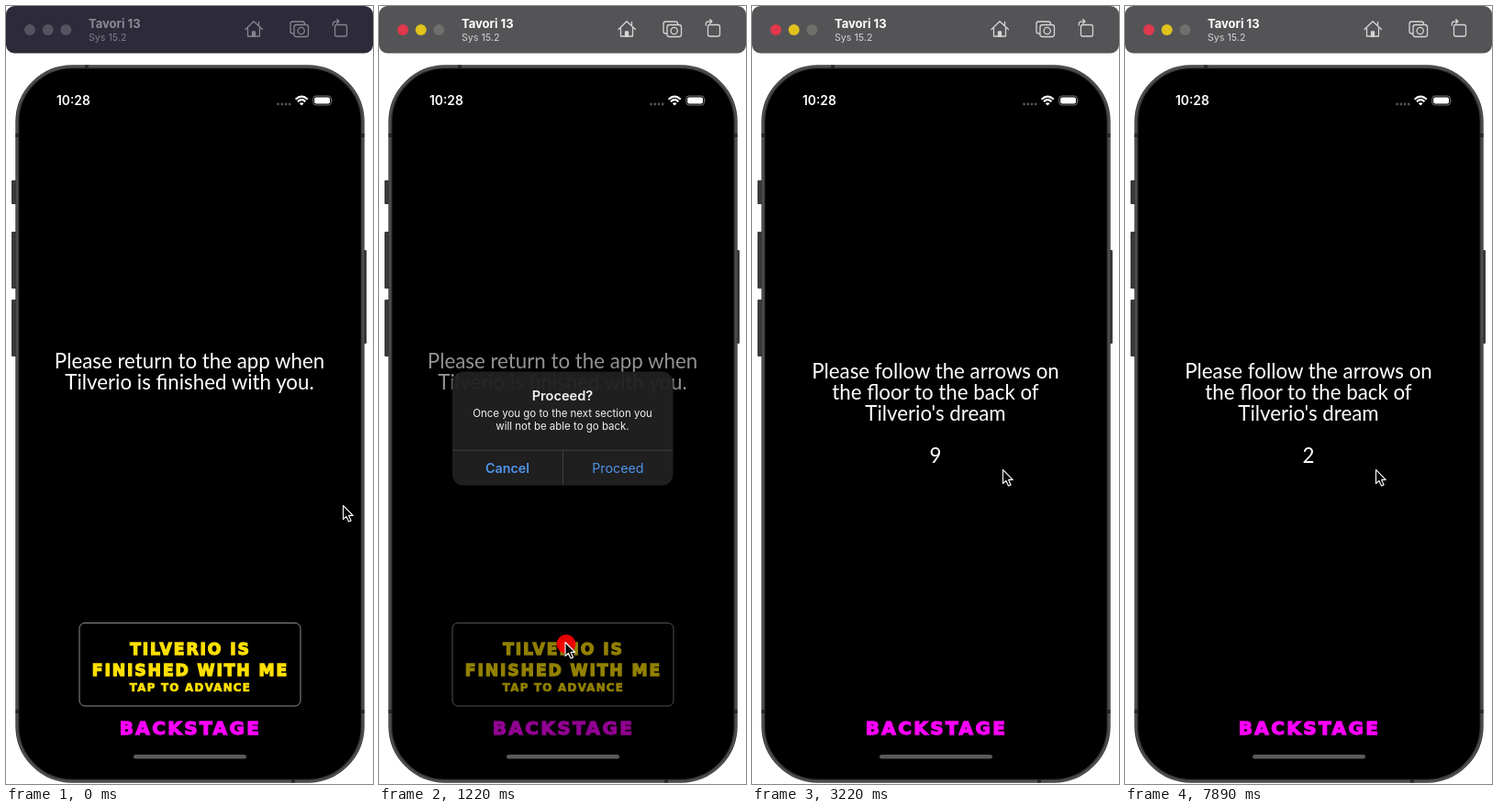
These frames come from a looping animation (400x848 px, 8 s). An HTML page:

```html
<!DOCTYPE html>
<html lang="en">
<head>
<meta charset="utf-8">
<title>Phone walkthrough</title>
<style>
html, body { margin: 0; width: 100%; height: 100%; overflow: hidden; background: #fff; }
svg { display: block; width: 400px; height: 848px; font-family: Inter, Roboto, sans-serif; }
.mid { text-anchor: middle; }
.copy { font: 22.3px Lato, sans-serif; fill: #fff; }
.deco { font: bold 17.2px "DejaVu Sans", sans-serif; letter-spacing: 1.9px; stroke-width: 1.3; }
.gold { fill: #ffe000; stroke: #ffe000; }
.pink { fill: #f0f; stroke: #f0f; }
.link { font-size: 14.2px; fill: #569cf6; }
#bar { --bg: #2d2b3a; --name: #8b8a92; --sub: #7c7b84; --icon: #85848c; --a: #55535f; --b: #55535f; --c: #55535f; }
#bar.on { --bg: #545457; --name: #fff; --sub: #d2d2d3; --icon: #d5d5d6; --a: #e0384c; --b: #e0c21b; --c: #6f6f6c; }
.icon { fill: none; stroke: var(--icon); stroke-width: 1.3; stroke-linejoin: round; stroke-linecap: round; }
</style>
</head>
<body>
<svg viewBox="0 0 400 848">
  <g id="bar">
    <rect width="400" height="51.5" rx="9" fill="var(--bg)"/>
    <circle cx="26" cy="26" r="6" fill="var(--a)"/>
    <circle cx="45.7" cy="26" r="6" fill="var(--b)"/>
    <circle cx="65.4" cy="26" r="6" fill="var(--c)"/>
    <text x="90" y="24" font-size="13" font-weight="700" fill="var(--name)">Tavori 13</text>
    <text x="90" y="37.5" font-size="10.7" fill="var(--sub)">Sys 15.2</text>
    <g class="icon">
      <path d="M261 25.5L270 16.8L279.5 25.5M263.5 24V33H276.5V24M275.5 21V17.5"/>
      <path d="M268.5 33V28H271.5V33Z" fill="var(--icon)"/>
      <rect x="310" y="17" width="15.5" height="13" rx="2.5"/>
      <rect x="314" y="20.5" width="15.5" height="13" rx="2.5" fill="var(--bg)"/>
      <circle cx="321.7" cy="27" r="3.6"/>
      <rect x="358.5" y="20.5" width="13" height="12.5" rx="2"/>
      <path d="M356.3 21V19.5Q356.3 16.8 359.5 16.8H363M360.5 14.6L363 16.8L360.5 19"/>
    </g>
  </g>

  <g fill="#39393b">
    <rect x="6" y="190" width="6" height="26" rx="1"/>
    <rect x="6" y="246" width="6" height="62" rx="1"/>
    <rect x="6" y="320" width="6" height="62" rx="1"/>
    <rect x="389" y="266" width="4" height="102" rx="1"/>
  </g>
  <rect x="12.3" y="66.3" width="376.4" height="778.4" rx="60" stroke="#39393b" stroke-width="4"/>
  <rect x="12" y="66" width="377" height="779" rx="60" fill="none" stroke="#555558" stroke-width="1.4"/>
  <path d="M10.5 141H14M387 141H390.5M10.5 769H14M387 769H390.5M88 64.5V68M313 843V846.5" stroke="#262628" stroke-width="4"/>

  <text x="55" y="108" font-size="13.8" font-weight="600" fill="#fff">10:28</text>
  <path d="M296.6 107H310" stroke="#555" stroke-width="2.8" stroke-linecap="round" stroke-dasharray="0 4.2"/>
  <g fill="none" stroke="#fff" stroke-width="2.1">
    <path d="M315.6 101.7Q322.2 95.4 328.8 101.7M318 104.2Q322.2 100.2 326.4 104.2"/>
    <path d="M322.2 108.6L319.9 106.2Q322.2 104.4 324.5 106.2Z" fill="#fff" stroke="none"/>
  </g>
  <rect x="334.8" y="98" width="19.6" height="10" rx="3" fill="none" stroke="#777"/>
  <rect x="336.2" y="99.4" width="16.8" height="7.2" rx="1.8" fill="#fff"/>
  <path d="M355.6 101.5Q357 103 355.6 104.5Z" fill="#777"/>

  <g id="page" class="mid">
    <g id="wait">
      <text class="copy" x="200" y="395">Please return to the app when</text>
      <text class="copy" x="200" y="418">Tilverio is finished with you.</text>
      <rect x="80" y="672.5" width="241" height="90.5" rx="6" fill="none" stroke="#8e8e8e"/>
      <g class="deco gold">
        <text x="201" y="706.7">TILVERIO IS</text>
        <text x="201" y="729.7">FINISHED WITH ME</text>
        <text x="201" y="746.6" style="font-size:11.8px;letter-spacing:1.3px;stroke-width:.7">TAP TO ADVANCE</text>
      </g>
    </g>
    <g id="walk" class="copy">
      <text x="200" y="406">Please follow the arrows on</text>
      <text x="200" y="429">the floor to the back of</text>
      <text x="200" y="452">Tilverio's dream</text>
      <text id="count" x="200" y="498"></text>
    </g>
    <text class="deco pink" x="201" y="794" style="font-size:20px;letter-spacing:2.4px">BACKSTAGE</text>
  </g>
  <rect x="139" y="816" width="123" height="4.6" rx="2.3" fill="#5b5b5b"/>

  <g id="alert" class="mid" fill="#fff">
    <rect x="80.7" y="399" width="239" height="123" rx="12" fill="#212122"/>
    <path d="M81 484H319.5M200.5 484V522" stroke="#414143"/>
    <text x="200" y="430" font-size="14.5" font-weight="600">Proceed?</text>
    <g font-size="11.4">
      <text x="200" y="448">Once you go to the next section you</text>
      <text x="200" y="462">will not be able to go back.</text>
    </g>
    <text class="link" x="140.5" y="508.5" font-weight="600">Cancel</text>
    <text class="link" x="260" y="508.5">Proceed</text>
  </g>

  <circle id="tap" fill="#f00" fill-opacity=".9"/>
  <path id="cursor" d="M.5 .5V15.5L3.9 12.4L6.5 18L9.1 16.9L6.6 11.4H11.2Z" stroke="#fff" stroke-width="1.1" stroke-linejoin="round"/>
</svg>
<script>
const $ = id => document.getElementById(id);
const LOOP = 8000, STEP = 1000 / 9;
const ease = u => u * u * (3 - 2 * u);
const mix = (a, b, u) => a + (b - a) * u;
const curve = (a, b, c, u) => mix(mix(a, b, u), mix(b, c, u), u);

function cursorAt(k) {
  if (k < 9) {
    const u = ease(k / 8);
    return [curve(367, 320, 201, u), curve(544, 465, 698, u)];
  }
  if (k < 12) return [k < 11 ? 204 : 202.5, k < 11 ? 694.5 : 693];
  if (k < 17) {
    const u = ease((k - 11) / 5);
    return [mix(202.5, 273, u), mix(693, 512, u)];
  }
  return [273, 505];
}

// Opacity and scale of the alert
function alertAt(k) {
  if (k < 10 || k > 21) return [0, 1];
  if (k === 10) return [.5, 1.07];
  if (k === 11) return [.95, 1.007];
  return [k < 20 ? 1 : k === 20 ? .6 : .05, 1];
}

function tapRadius(k) {
  if (k >= 9 && k < 13) return 17 - (k - 9) * 3.3;
  if (k >= 20 && k < 24) return 14.4 - (k - 20) * 3.4;
  return 0;
}

function draw(now) {
  const k = Math.floor((now % LOOP + 5) / STEP);
  const [x, y] = cursorAt(k);
  const [shown, scale] = alertAt(k);
  const walking = k >= 23;

  $('bar').classList.toggle('on', k >= 10);
  $('wait').style.display = walking ? 'none' : '';
  $('walk').style.display = walking ? '' : 'none';
  $('count').textContent = 10 - Math.max(0, Math.floor((k - 23) / 6));
  $('page').style.opacity = 1 - .45 * (k === 21 ? 0 : shown);

  $('alert').style.opacity = shown;
  $('alert').setAttribute('transform', `translate(200 460.5) scale(${scale}) translate(-200 -460.5)`);

  const tap = $('tap');
  tap.setAttribute('r', tapRadius(k));
  tap.setAttribute('cx', k < 15 ? 204 : 273);
  tap.setAttribute('cy', k < 15 ? 695.5 : 507);
  $('cursor').setAttribute('transform', `translate(${x} ${y})`);
  requestAnimationFrame(() => draw(performance.now() - start));
}

const start = performance.now();
draw(0);
</script>
</body>
</html>
```
